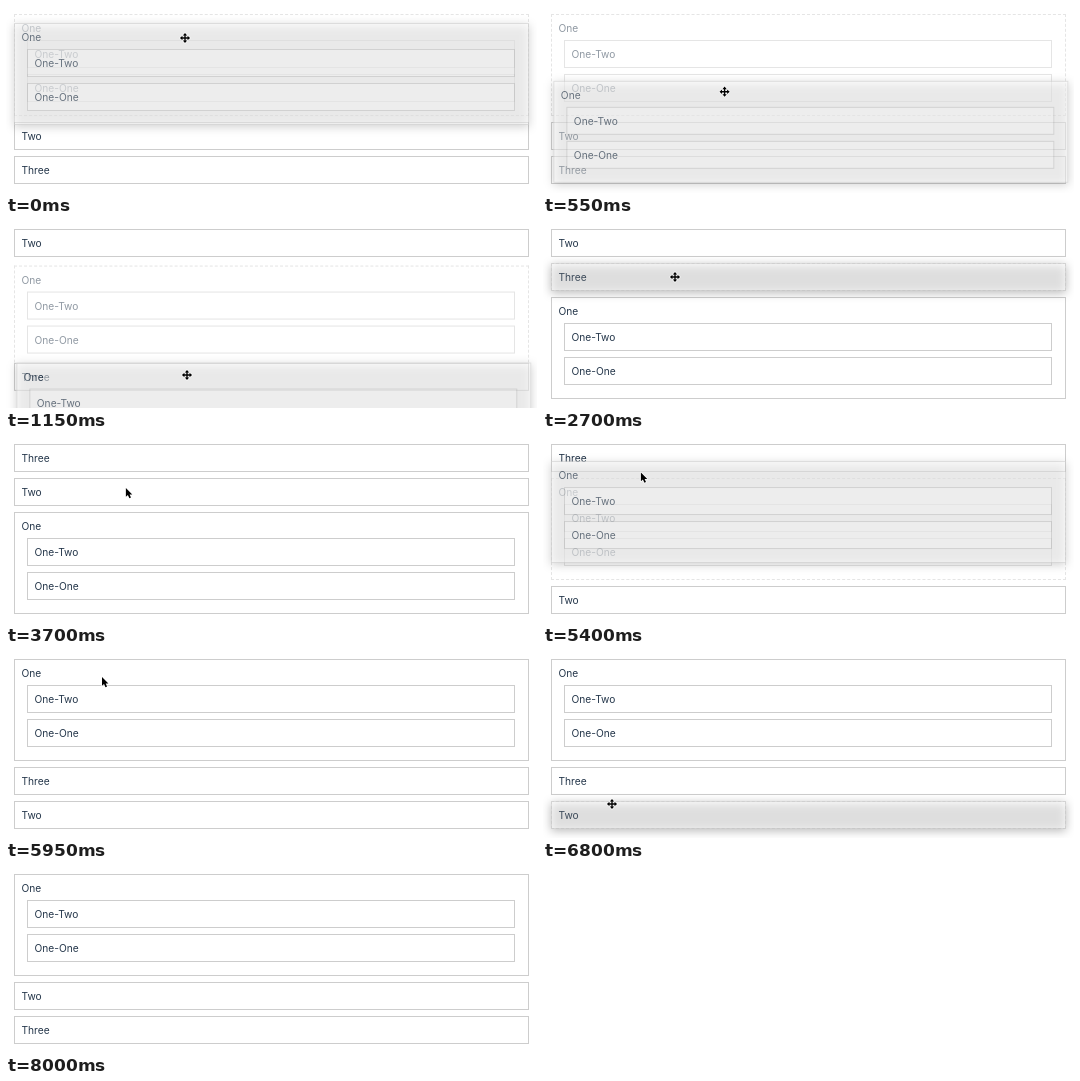
An HTML page for the animation above (8200 ms loop, 531 px wide and 187 px high).

```html
<!DOCTYPE html>
<html lang="en">
<head>
<meta charset="utf-8">
<title>Nested sortable list</title>
<style>
html, body { margin: 0; width: 100%; height: 100%; overflow: hidden; background: #fff; }
#stage { position: relative; width: 531px; height: 187px; overflow: hidden;
  font: 10.2px/26px Inter, "Liberation Sans", sans-serif; color: #24364a; }
.box { position: absolute; box-sizing: border-box; height: 28px; padding-left: 6.5px;
  border: 1px solid #cdcdcd; background: #fff; white-space: nowrap; }
.item { left: 8px; top: 0; width: 515px; }
.tall { height: 102px; }
.inner { left: 12px; width: 488px; line-height: 27px; }
.held { opacity: .5; border-style: dashed; }
.drag { position: absolute; left: 0; top: 0; visibility: hidden; }
.shade { position: absolute; left: 8px; top: 2px; width: 515px; height: 28px;
  background: rgba(0, 0, 0, .27); filter: blur(5px); }
.shade.tall { height: 102px; background: rgba(0, 0, 0, .18); }
.drag .item { opacity: .61; background: rgba(255, 255, 255, .86); }
.drag .box { border-color: #d2d2d2; }
#cursor { position: absolute; left: -10px; top: -10px; }
</style>
</head>
<body>
<div id="stage"></div>
<script>
const LOOP = 8200, STEP = 50, SLIDE = 220, LAG = 50, POINTER_END = 7500;
const TOP = 8, GAP = 6;
const stage = document.getElementById('stage');
const names = ['One', 'Two', 'Three'];
const heights = [102, 28, 28];

// time of each swap and the order it leads to
const orders = [
  [0, '012'], [880, '102'], [1113, '120'], [2860, '210'],
  [4180, '201'], [5580, '021'], [6830, '012']
].map(([time, order]) => ({ time, tops: stack(order) }));

const drags = [
  { item: 0, from: -100, to: 1600, cross: true },
  { item: 2, from: 2650, to: 3350, cross: true },
  { item: 1, from: 3900, to: 4700, cross: true },
  { item: 0, from: 5100, to: 5850, cross: false },
  { item: 1, from: 6750, to: 7250, cross: true }
];

// pointer hot spot: [time, x, y]
const path = [
  [-100, 179, 14], [0, 179, 32], [850, 183, 115], [1150, 181, 154], [1400, 176, 164],
  [1600, 176, 164], [2400, 128, 56], [2650, 132, 56], [2700, 132, 56], [3200, 126, 24],
  [3350, 126, 24], [3750, 119, 56], [4000, 119, 56], [4400, 120, 121], [4700, 118, 136],
  [5100, 98, 56], [5380, 98, 37], [5800, 96, 26], [6100, 96, 26], [6750, 69, 164],
  [6800, 69, 153], [7050, 76, 131], [7350, 76, 131], [7500, 92, 100]
];

function stack(order) {
  const tops = [];
  let y = TOP;
  for (const i of order) {
    tops[i] = y;
    y += heights[i] + GAP;
  }
  return tops;
}

function add(parent, cls, text = '') {
  const el = document.createElement('div');
  el.className = cls;
  el.textContent = text;
  parent.append(el);
  return el;
}

function addItem(parent, i) {
  const el = add(parent, 'box item' + (i ? '' : ' tall'), names[i]);
  if (!i) ['One-Two', 'One-One'].forEach((label, n) => {
    add(el, 'box inner', label).style.top = 25 + 34 * n + 'px';
  });
  return el;
}

const items = names.map((_, i) => addItem(stage, i));
const copies = names.map((_, i) => {
  const el = add(stage, 'drag');
  add(el, 'shade' + (i ? '' : ' tall'));
  addItem(el, i);
  return el;
});

stage.insertAdjacentHTML('beforeend', `
<svg id="cursor" width="24" height="24" viewBox="-10 -10 24 24" stroke="#fff"
  stroke-width="1.2" paint-order="stroke" stroke-linejoin="round">
  <path id="cross" transform="scale(.85)"
    d="M0-6L2.6-3H.8V-.8H3V-2.6L6 0L3 2.6V.8H.8V3H2.6L0 6L-2.6 3H-.8V.8H-3V2.6L-6 0L-3-2.6V-.8H-.8V-3H-2.6Z"/>
  <path id="arrow" d="M0 0V8.8L2 7L3.5 10.3L5.1 9.6L3.7 6.4H6.4Z"/>
</svg>`);
const [cursor, cross, arrow] = ['cursor', 'cross', 'arrow'].map(id => document.getElementById(id));

const smooth = u => u * u * (3 - 2 * u);
const clamp = u => Math.min(1, Math.max(0, u));
const move = (el, x, y) => { el.style.transform = `translate(${x}px, ${y}px)`; };
const show = (el, on) => { el.style.visibility = on ? 'visible' : 'hidden'; };

function pointerAt(t) {
  const n = path.findIndex(p => p[0] > t);
  if (n < 0) return path[path.length - 1].slice(1);
  const a = path[Math.max(0, n - 1)], b = path[n];
  const u = clamp((t - a[0]) / (b[0] - a[0] || 1));
  return [1, 2].map(k => a[k] + (b[k] - a[k]) * u);
}

function topOf(i, t) {
  return orders.slice(1).reduce((y, { time, tops }, n) =>
    y + (tops[i] - orders[n].tops[i]) * smooth(clamp((t - time) / SLIDE)),
  orders[0].tops[i]);
}

// the dragged copy trails the pointer slightly
function dragAt({ item, from }, t) {
  const [x0, y0] = pointerAt(from);
  const [x, y] = pointerAt(Math.max(from, t - LAG));
  return [x - x0, topOf(item, from) + y - y0];
}

function render(t) {
  const drag = drags.find(d => t >= d.from && t < d.to);
  items.forEach((el, i) => {
    const held = !!drag && drag.item === i;
    move(el, 0, topOf(i, t));
    el.classList.toggle('held', held);
    show(copies[i], held);
    if (held) move(copies[i], ...dragAt(drag, t));
  });
  const on = t < POINTER_END;
  const crossed = !!drag && drag.cross;
  move(cursor, ...pointerAt(t));
  show(cross, on && crossed);
  show(arrow, on && !crossed);
}

const start = performance.now();
function tick() {
  const t = (performance.now() - start) % LOOP;
  render(Math.floor(t / STEP) * STEP);
  requestAnimationFrame(tick);
}
tick();
</script>
</body>
</html>
```
